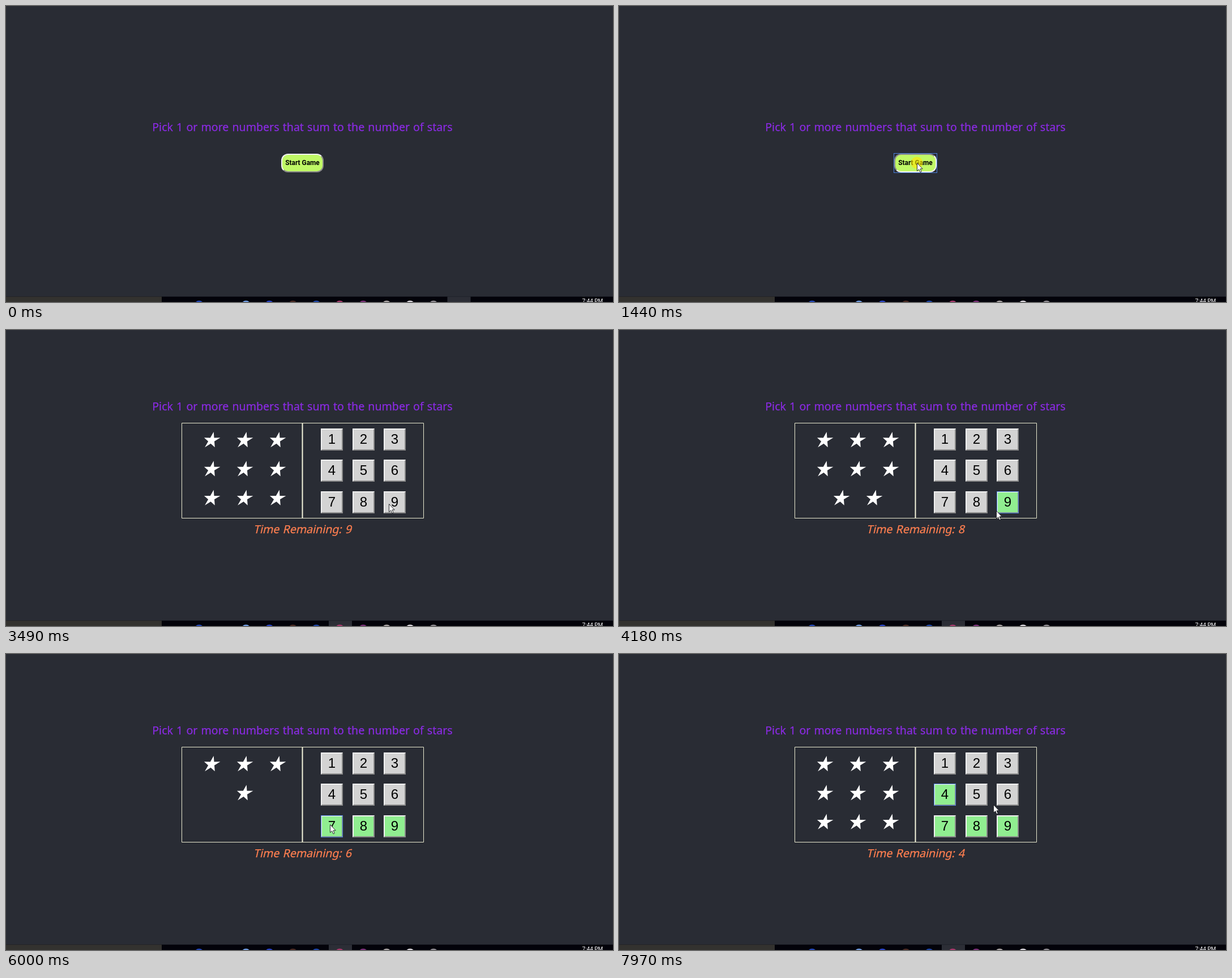
An HTML page for the animation above (8 s loop, 1072 by 523 pixels).

```html
<!DOCTYPE html>
<html lang="en">
<head>
<meta charset="utf-8">
<title>Star numbers</title>
<style>
  html, body { margin: 0; width: 100%; height: 100%; overflow: hidden; background: #292c34; }
  #stage { position: relative; width: 1072px; height: 523px; overflow: hidden; }
  svg { position: absolute; left: 0; top: 0; }
  .title, .time { font: 19.6px "Noto Sans", sans-serif; word-spacing: 1px; text-anchor: middle; stroke-width: .25; }
  .title { fill: #8a2be2; stroke: #8a2be2; }
  .time { fill: #ff7f50; stroke: #ff7f50; }
  .clock { font: 10px Roboto, sans-serif; fill: #fff; }
  .btn {
    position: absolute; box-sizing: border-box; text-align: center; color: #000;
    border: 2px solid; border-color: #f0f0f0 #8a8a8a #8a8a8a #f0f0f0;
  }
  .btn.down { border-color: #8a8a8a #f0f0f0 #f0f0f0 #8a8a8a; }
  .btn.focus { outline: 1px solid #5288dc; outline-offset: -1px; }
  .num { width: 39px; height: 39px; background: #d3d3d3; font: 24px/34px "Liberation Sans", sans-serif; }
  .num.used { background: #90ee90; }
  #start {
    left: 486px; top: 261px; width: 75px; height: 33px; border-radius: 12px;
    background: #c0f866; font: bold 11.9px/29px Roboto, sans-serif; white-space: nowrap;
  }
  /* the focus ring stays square around the rounded button */
  #start.focus { outline: none; }
  #start.focus::after {
    content: ""; position: absolute; inset: -3px; border: 1px solid #4a80dc;
  }
</style>
</head>
<body>
<div id="stage">
  <svg width="1072" height="523">
    <rect y="513.5" width="1072" height="10" fill="#03030a"/>
    <rect y="513.5" width="275" height="10" fill="#33322f"/>
    <rect id="tab" y="513.5" width="41" height="10" fill="#2c2e36"/>
    <g id="icons"></g>
    <text class="clock" x="1017.5" y="525.3">7:44 PM</text>
    <text class="title" id="title" x="523.5">Pick 1 or more numbers that sum to the number of stars</text>
    <g id="board">
      <path d="M310.5 164.5H737.5V332.5H310.5Z" fill="none" stroke="#e9e9cf"/>
      <path d="M523.5 165V332" stroke="#f5f5dc" stroke-width="2"/>
      <g id="stars" fill="#fff"></g>
      <text class="time" id="time" transform="translate(523.5 359) skewX(-13)"></text>
    </g>
  </svg>
  <div id="pad"></div>
  <div id="start" class="btn">Start Game</div>
  <svg width="1072" height="523">
    <g id="cursor">
      <circle id="press" r="10.5" fill="#ffe600" opacity=".6"/>
      <path d="M.5 .5V14.5L3.7 11.6L6 16.8L8.2 15.8L6 10.8H10.2Z" fill="#fff" stroke="#17181c" stroke-width=".9"/>
    </g>
  </svg>
</div>
<script>
const LOOP = 8000, GAME_START = 1520, SECOND = 1010, STEP = 78;
const $ = id => document.getElementById(id);

function svg(parent, tag, attrs) {
  const el = document.createElementNS("http://www.w3.org/2000/svg", tag);
  for (const key in attrs) el.setAttribute(key, attrs[key]);
  return parent.appendChild(el);
}

// Tops of the evenly spaced taskbar icons; the second place is empty
["#2448b8", "none", "#6f9be0", "#2a45c8", "#4a2a22", "#1d46a8",
 "#a8396c", "#7a2f78", "#a9a3a3", "#d8d4da", "#8e8a90"].forEach((fill, i) =>
  svg($("icons"), "circle", { cx: 341 + i * 41.4, cy: 529, r: 8.5, fill }));

// Slanted five-pointed star around the origin
const starPoints = Array.from({ length: 10 }, (_, i) => {
  const r = i % 2 ? 5.7 : 15, a = i * Math.PI / 5;
  const y = -r * Math.cos(a);
  return [r * Math.sin(a) - y / 4, y];
}).join(" ");
const stars = Array.from({ length: 9 }, () => svg($("stars"), "polygon", { points: starPoints }));

const buttons = Array.from({ length: 9 }, (_, i) => {
  const el = document.createElement("div");
  el.className = "btn num";
  el.textContent = i + 1;
  el.style.left = Math.round(556 + i % 3 * 55.6) + "px";
  el.style.top = Math.round(173.6 + Math.floor(i / 3) * 55.5) + "px";
  return $("pad").appendChild(el);
});

// Number 0 is the start button; stars is the count shown after release
const clicks = [
  { num: 0, down: 1440, up: GAME_START, stars: 9 },
  { num: 9, down: 3710, up: 3870, stars: 8 },
  { num: 8, down: 4880, up: 4970, stars: 7 },
  { num: 7, down: 5830, up: 6000, stars: 4 },
  { num: 4, down: 7120, up: 7170, stars: 9 }
];

// Each sweep starts where the one before ended
const sweeps = [
  { from: 230, to: 600, via: [502, 310], end: [518, 267] },
  { from: 770, to: 1070, via: [522, 271], end: [526, 277] },
  { from: 1830, to: 2150, via: [572, 424], end: [435, 319] },
  { from: 2240, to: 2320, via: [456, 330], end: [482, 335] },
  { from: 3010, to: 3490, via: [590, 292], end: [676, 307] },
  { from: 3950, to: 4650, via: [658, 322], end: [636, 315] },
  { from: 5370, to: 5740, via: [605, 276], end: [572, 301] },
  { from: 6410, to: 6940, via: [637, 240], end: [577, 245] },
  { from: 7490, to: 7970, via: [645, 213], end: [661, 266] }
];
sweeps.forEach((s, i) => s.start = i ? sweeps[i - 1].end : [708, 470]);

// Parabola through start, via (halfway) and end, sampled in steps
function cursorAt(t) {
  const s = sweeps.filter(s => t >= s.from).pop();
  if (!s) return null;
  const count = Math.round((s.to - s.from) / STEP) + 1;
  const u = Math.min((Math.floor((t - s.from) / STEP) + 1) / count, 1);
  return s.start.map((a, axis) => {
    const m = s.via[axis], b = s.end[axis];
    return Math.round(a + (b - a) * u + (4 * m - 2 * a - 2 * b) * u * (1 - u));
  });
}

function show(el, on) {
  el.style.display = on ? "" : "none";
}

function layStars(count) {
  stars.forEach((star, i) => {
    const row = Math.floor(i / 3), inRow = Math.min(3, count - row * 3);
    const x = 421 + (i % 3 - (inRow - 1) / 2) * 58;
    star.setAttribute("transform", `translate(${x} ${195 + row * 51.3})`);
    show(star, i < count);
  });
}

function draw(t) {
  const playing = t >= GAME_START;
  const pressed = clicks.filter(c => t >= c.down).pop();
  const released = clicks.filter(c => t >= c.up);
  const down = !!pressed && t < pressed.up;

  $("title").setAttribute("y", playing ? 142 : 221);
  show($("board"), playing);
  show($("pad"), playing);
  show($("start"), !playing);
  show($("tab"), !pressed || playing);
  $("tab").setAttribute("x", playing ? 570 : 779.5);
  $("start").className = "btn" + (down ? " focus down" : "");

  if (playing) {
    layStars(released[released.length - 1].stars);
    $("time").textContent = "Time Remaining: " + (10 - Math.floor((t - GAME_START - 20) / SECOND + .02));
    buttons.forEach((el, i) => {
      const active = pressed.num === i + 1;
      el.className = "btn num" + (released.some(c => c.num === i + 1) ? " used" : "")
        + (active ? " focus" : "") + (active && down ? " down" : "");
    });
  }

  const pos = cursorAt(t);
  show($("cursor"), pos);
  if (pos) $("cursor").setAttribute("transform", `translate(${pos})`);
  show($("press"), down);
}

const begin = performance.now();
function frame() {
  draw((performance.now() - begin) % LOOP);
  requestAnimationFrame(frame);
}
frame();
</script>
</body>
</html>
```
